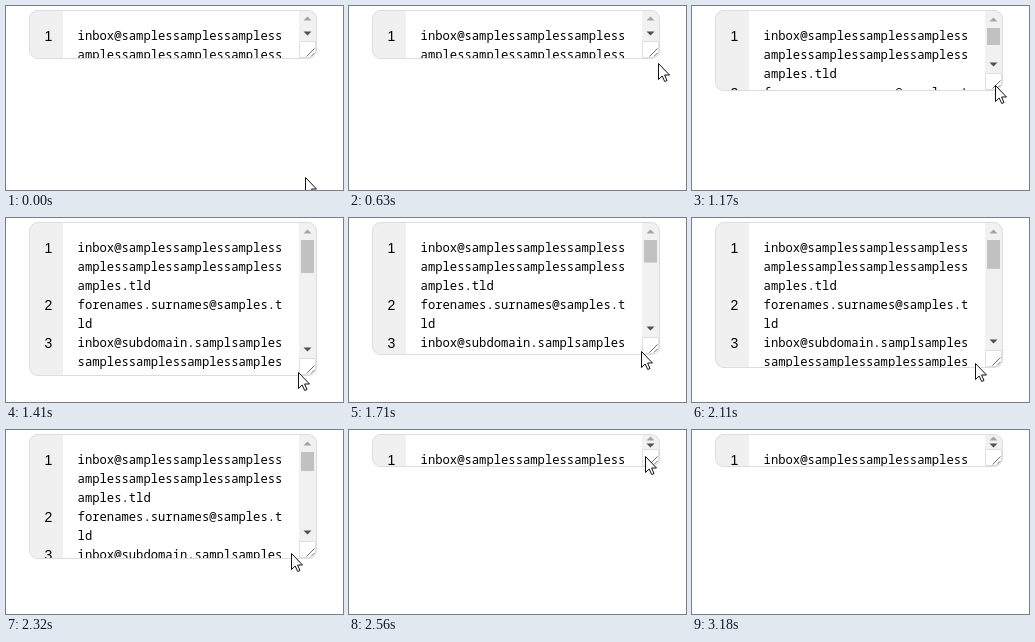
Write an HTML page that moves like this. It is 337 by 184 pixels and loops after 3420 ms.

```html
<!DOCTYPE html>
<html lang="en">
<head>
<meta charset="utf-8">
<title>Resizable numbered text area</title>
<style>
html, body { margin: 0; width: 100%; height: 100%; overflow: hidden; background: #fff; }
svg { display: block; width: 337px; height: 184px; }
#lines { font: 12.2px "Noto Sans Mono", "DejaVu Sans Mono", monospace; }
#nums { font: 14px "Liberation Sans", Arial, sans-serif; text-anchor: middle; }
</style>
</head>
<body>
<svg viewBox="0 0 337 184">
  <clipPath id="clip"><rect class="frame" x="23.5" y="4.5" width="287" rx="8.5"/></clipPath>
  <g clip-path="url(#clip)">
    <path d="M23 4h34v180h-34z" fill="#f0f0f0"/>
    <g id="nums"></g>
    <g id="lines"></g>
    <rect id="track" x="293" y="5" width="17" fill="#f1f1f1"/>
    <rect id="thumb" x="295" y="22" width="13" fill="#c1c1c1"/>
    <path id="up" d="M-4 2L0-2L4 2z" fill="#a3a3a3"/>
    <path id="down" d="M-4-2L0 2L4-2z" fill="#505050"/>
    <g id="corner">
      <path d="M.5.5h16v16h-16z" fill="#fff" stroke="#dedede"/>
      <path d="M7.5 15.5l8-8M12 15.5l3.5-3.5" stroke="#707070" fill="none"/>
    </g>
  </g>
  <rect class="frame" x="23.5" y="4.5" width="287" rx="8.5" fill="none" stroke="#d3e0e6"/>
  <path id="cursor" d="M.5.5V16.5L4.2 13L6.7 18.5L9 17.5L6.6 12H11.5z" fill="#fff" stroke="#111"/>
</svg>
<script>
const $ = id => document.getElementById(id);
const LOOP = 3420, TOP = 34, LEADING = 19;

const entries = [
  "inbox@" + "samples".repeat(8) + ".tld",
  "forenames.surnames@samples.tld",
  "inbox@subdomain.sampl" + "samples".repeat(5)
];

function addText(parent, x, y, text) {
  const el = document.createElementNS("http://www.w3.org/2000/svg", "text");
  el.setAttribute("x", x);
  el.setAttribute("y", y);
  el.textContent = text;
  parent.append(el);
}

let row = 0;
entries.forEach((entry, i) => {
  addText($("nums"), 42.5, TOP + row * LEADING + .5, i + 1);
  for (const part of entry.match(/.{1,28}/g)) addText($("lines"), 71.6, TOP + row++ * LEADING, part);
});

// Bursts of movement: start, end, number of steps
const bursts = [
  [70, 550, 7], [630, 850, 4], [1090, 1410, 5],
  [1710, 2190, 7], [2290, 2560, 5], [2720, 3180, 7]
];

// Time, cursor x, cursor y, bottom of the box
const keys = [
  [0, 299, 171, 52], [550, 311, 64, 52], [630, 309, 57, 52], [850, 304, 44, 52],
  [1010, 304, 44, 52], [1090, 306, 54, 60], [1410, 292, 154, 157],
  [1630, 292, 154, 157], [1870, 293, 92, 95], [1950, 292, 79, 82],
  [2110, 283, 145, 149], [2190, 282, 148, 152], [2220, 282, 148, 152],
  [2560, 296, 26, 36], [2640, 296, 26, 36], [2950, 314, 90, 36],
  [3180, 313, 187, 36], [LOOP, 313, 187, 36]
];

function snap(t) {
  const burst = bursts.findLast(b => b[0] <= t);
  if (!burst) return 0;
  const [start, end, count] = burst;
  const step = (end - start) / (count - 1);
  return start + Math.min(count - 1, Math.floor((t - start) / step + 1e-6)) * step;
}

function pose(t) {
  const i = keys.findIndex(k => k[0] > t);
  const a = keys[i - 1], b = keys[i];
  const p = (t - a[0]) / (b[0] - a[0]);
  return a.slice(1).map((v, j) => Math.round(v + (b[j + 1] - v) * p));
}

function place(id, x, y) {
  $(id).setAttribute("transform", `translate(${x} ${y})`);
}

function draw(t) {
  const [x, y, bottom] = pose(snap(t));
  const end = bottom - 17, track = end - 5;
  const button = Math.min(17, Math.floor(track / 2));
  const room = track - 34;
  for (const el of document.querySelectorAll(".frame")) el.setAttribute("height", bottom - 4);
  $("track").setAttribute("height", track);
  $("thumb").setAttribute("height", room < 17 ? 0 : Math.max(17, room * (bottom - 5) / 465));
  place("up", 301.5, 5 + button / 2);
  place("down", 301.5, end - button / 2);
  place("corner", 293, end);
  place("cursor", x, y);
}

function tick() {
  draw(performance.now() % LOOP);
  requestAnimationFrame(tick);
}
tick();
</script>
</body>
</html>
```
